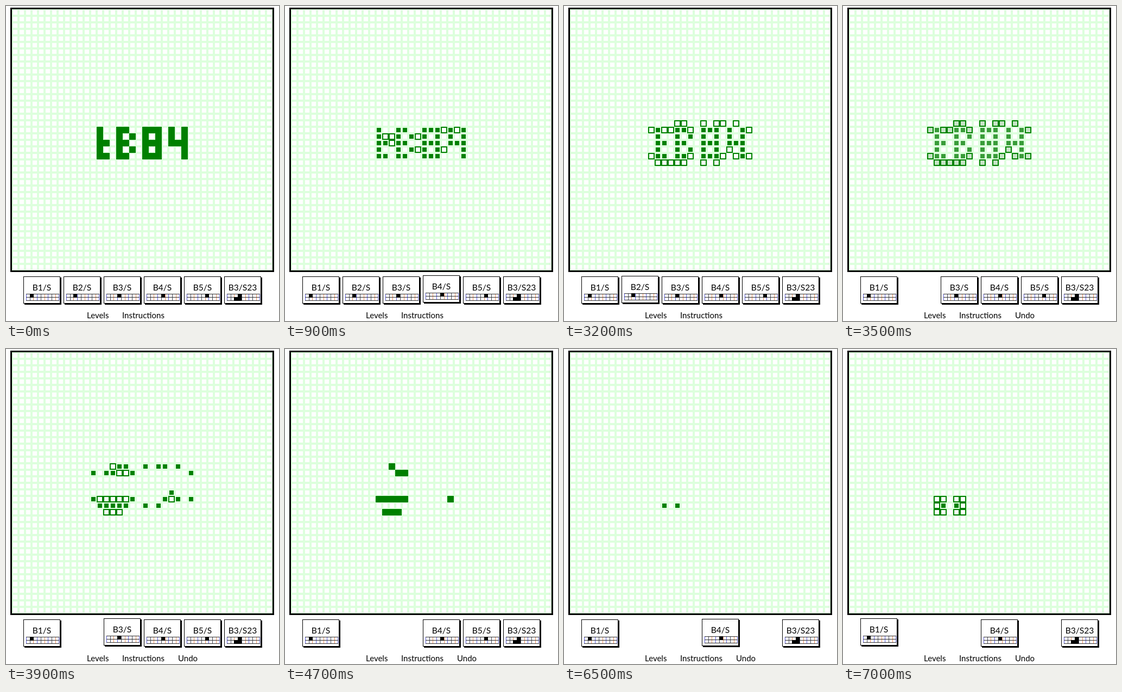
An HTML page with a canvas for the animation above (8 s loop, 503x579 px).

```html
<!DOCTYPE html>
<html lang="en">
<head>
<meta charset="utf-8">
<title>Cell rules</title>
<style>
  html, body { margin: 0; width: 100%; height: 100%; overflow: hidden; background: #fff; }
  body { position: relative; font: 15px/20px Lato, sans-serif; color: #000; }
  canvas { position: absolute; left: 8px; top: 3px; border: 3px solid #000; }
  .card {
    position: absolute; top: 497px; width: 68px; height: 50px; box-sizing: border-box;
    border: 1px solid #000; background: #fff; box-shadow: 2px 2px #000;
    font-size: 15.6px; text-align: center; padding-top: 9px;
  }
  .card svg { position: absolute; left: 4px; top: 31px; }
  .pressed { border-color: #2a5bd0; }
  .link { position: absolute; top: 558px; }
</style>
</head>
<body>
<canvas id="board" width="480" height="480"></canvas>
<span class="link" style="left:149px">Levels</span>
<span class="link" style="left:214px">Instructions</span>
<span class="link" style="left:317px" id="undo">Undo</span>
<script>
const LOOP = 8000, STEP = 100, FADE = 180, PRESS = 60, RAISE = 150;
const SIZE = 40, CELL = 12, GREEN = '#008000';
const ctx = document.getElementById('board').getContext('2d');
const undo = document.getElementById('undo');

// Start pattern: five rows of cells, top left at column 13, row 18
const letters = [
  '#..##..###.#.#',
  '#..#.#.#.#.#.#',
  '##.##..###.###',
  '#..#.#.#.#...#',
  '##.##..###...#'
];

// Rule buttons: neighbour counts for birth and survival
const rules = [['1', ''], ['2', ''], ['3', ''], ['4', ''], ['5', ''], ['3', '23']];

// [time, button under the pointer], -1 for none
const hovers = [[0, -1], [690, 3], [1940, 2], [3150, 1], [3460, -1], [3740, 2], [4520, -1],
  [5060, 3], [5390, 4], [5920, -1], [6390, 3], [6680, -1], [6840, 0]];
// [time, button used up]
const plays = [[3460, 1], [4520, 2], [5920, 4]];

const key = (x, y) => y * SIZE + x;

function nextGen(live, [birth, survive]) {
  const next = new Set();
  for (let y = 0; y < SIZE; y++) for (let x = 0; x < SIZE; x++) {
    let n = 0;
    for (let dy = -1; dy <= 1; dy++) for (let dx = -1; dx <= 1; dx++) {
      const u = x + dx, v = y + dy;
      if ((dx || dy) && u >= 0 && v >= 0 && u < SIZE && v < SIZE && live.has(key(u, v))) n++;
    }
    if ((live.has(key(x, y)) ? survive : birth).includes(n)) next.add(key(x, y));
  }
  return next;
}

const start = new Set();
letters.forEach((row, y) => [...row].forEach((c, x) => {
  if (c === '#') start.add(key(x + 13, y + 18));
}));
const gens = [start];
for (const [, b] of plays) gens.push(nextGen(gens[gens.length - 1], rules[b]));

function makeStrip(rule) {
  const w = 6.7, h = 6, tints = ['#55d', '#445', '#f08a5a'];
  let s = '';
  for (let i = 0; i < 10; i++)
    s += `<path d="M${Math.round(i * w) + .5} 0v13" stroke="${tints[i % 3]}"/>`;
  for (let j = 0; j < 3; j++) s += `<path d="M0 ${j * h + .5}h61" stroke="#333"/>`;
  rule.forEach((counts, j) => [...counts].forEach(n => {
    s += `<rect x="${Math.round(n * w)}" y="${j * h}" width="7" height="7"/>`;
  }));
  return `<svg width="61" height="13">${s}</svg>`;
}

const cards = rules.map((rule, i) => {
  const el = document.createElement('div');
  el.className = 'card';
  el.style.left = 32 + 74 * i + 'px';
  el.innerHTML = `B${rule[0]}/S${rule[1]}` + makeStrip(rule);
  document.body.append(el);
  return el;
});

function box(k, inset, color, alpha = 1) {
  ctx.globalAlpha = alpha;
  ctx.fillStyle = color;
  const side = CELL - 2 * inset;
  ctx.fillRect(k % SIZE * CELL + inset, Math.floor(k / SIZE) * CELL + inset, side, side);
  ctx.globalAlpha = 1;
}

// p = 0 shows a preview, p = 1 the finished step
function drawChange(live, next, p) {
  for (const k of live) if (!next.has(k)) box(k, 2, GREEN, 1 - p);
  for (const k of next) {
    box(k, 0, GREEN);
    if (!live.has(k)) {
      box(k, 2, '#fff');
      box(k, 2, GREEN, p);
    }
  }
}

function draw(t) {
  const done = plays.filter(([at]) => t >= at);
  const live = gens[done.length];
  const [since, over] = hovers.filter(([at]) => t >= at).pop();
  const p = done.length ? (t - done[done.length - 1][0]) / FADE : 1;

  ctx.fillStyle = '#dfd';
  ctx.fillRect(0, 0, 480, 480);
  for (let k = 0; k < SIZE * SIZE; k++) box(k, 2, '#fff');
  if (p < 1) drawChange(gens[done.length - 1], live, p);
  else if (over >= 0) drawChange(live, nextGen(live, rules[over]), 0);
  else for (const k of live) box(k, 0, GREEN);

  cards.forEach((el, i) => {
    const lift = i === over ? 2 * Math.min(1, (t - since) / RAISE) : 0;
    el.style.transform = `translateY(${-Math.round(lift)}px)`;
    el.style.visibility = done.some(([, b]) => b === i) ? 'hidden' : 'visible';
    el.classList.toggle('pressed', plays.some(([at, b]) => b === i && t >= at - PRESS && t < at));
  });
  undo.style.visibility = done.length ? 'visible' : 'hidden';
}

const begin = performance.now();
function frame() {
  const t = (performance.now() - begin) % LOOP;
  draw(Math.floor(t / STEP) * STEP);
  requestAnimationFrame(frame);
}
frame();
</script>
</body>
</html>
```
